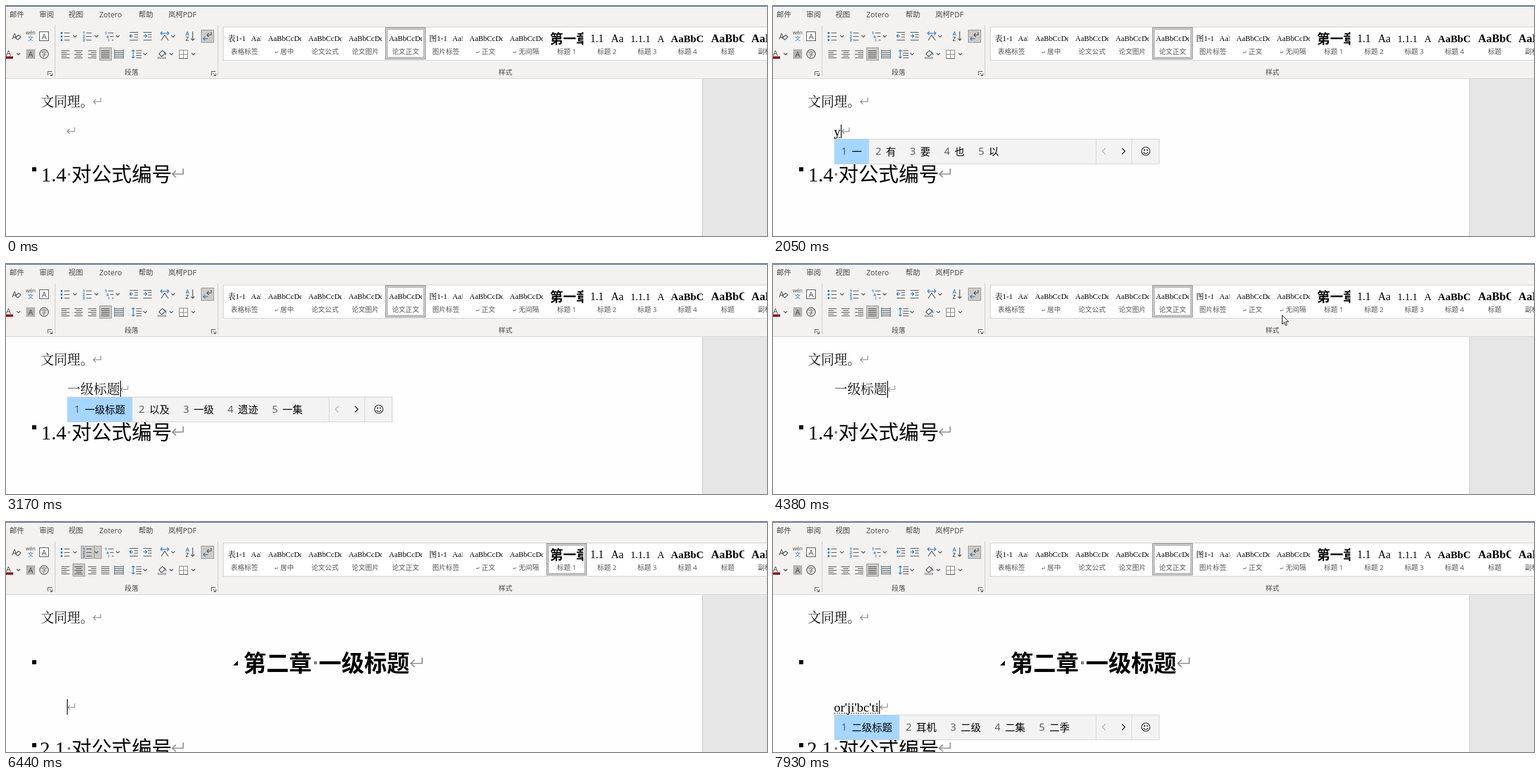
Recreate the animation shown at these times as an HTML page with a canvas. Size 1280x388 px, loop 8000 ms.

```html
<!DOCTYPE html>
<html lang="zh">
<head>
<meta charset="utf-8">
<style>
html, body { margin: 0; overflow: hidden; background: #fefefe; }
canvas { display: block; }
</style>
</head>
<body>
<canvas id="stage" width="1280" height="388"></canvas>
<script>
const g = document.getElementById('stage').getContext('2d');
const LOOP = 8000, TILE = 67.75, GALLERY = 367;
const UI = "'Open Sans','Noto Sans CJK SC','Noto Sans CJK',sans-serif";
const HEI = "'Noto Sans CJK SC','Noto Sans CJK',sans-serif";
const SONG = "'Noto Serif CJK SC','Noto Sans CJK SC','Noto Sans CJK',serif";
const ROMAN = "'Liberation Serif'," + SONG;
const INK = '#444', BLUE = '#2878c0', GRAY = '#808080';

function text(s, x, y, size, family = UI, color = '#000', weight = 400, align = 'left') {
  g.font = `${weight} ${size}px ${family}`;
  g.fillStyle = color;
  g.textAlign = align;
  g.fillText(s, x, y);
}
function rect(x, y, w, h, fill, stroke) {
  if (fill) { g.fillStyle = fill; g.fillRect(x, y, w, h); }
  if (stroke) { g.strokeStyle = stroke; g.lineWidth = 1; g.strokeRect(x + .5, y + .5, w - 1, h - 1); }
}
function line(color, width, ...p) {
  g.beginPath();
  for (let i = 0; i < p.length; i += 2) g.lineTo(p[i], p[i + 1]);
  g.strokeStyle = color;
  g.lineWidth = width;
  g.stroke();
}
function poly(fill, ...p) {
  g.beginPath();
  for (let i = 0; i < p.length; i += 2) g.lineTo(p[i], p[i + 1]);
  g.closePath();
  g.fillStyle = fill;
  g.fill();
}
function circle(x, y, r, color, a = 0, b = 7) {
  g.beginPath();
  g.arc(x, y, r, a, b);
  g.strokeStyle = color;
  g.lineWidth = 1.2;
  g.stroke();
}
const chevron = x => y => line(INK, 1.1, x - 3, y - 1.5, x, y + 1.5, x + 3, y - 1.5);
function returnMark(x, y, s, color = GRAY) {
  const w = Math.max(.8, s / 11), a = s * .32;
  line(color, w, x + s, y - s * .5, x + s, y + .5, x, y + .5);
  line(color, w, x + a, y + .5 - a, x, y + .5, x + a, y + .5 + a);
}
const caret = (x, y, h) => rect(x, y, 1.3, h, '#000');

// ---- ribbon ----
function textLines(x, y, widths, shift = 0, color = INK) {
  widths.forEach((w, i) => rect(x + Math.round((14 - w) * shift), y + i * 3, w, 1, color));
}
const pressed = (x, y, w) => rect(x, y, w, 22, '#cdcbc9', '#979593');

function listIcon(x, kind) {
  for (let i = 0; i < 3; i++) {
    const y = 45 + i * 6, dx = kind === 2 ? i * 3 : 0;
    if (kind) text(kind === 2 ? '1ai'[i] : i + 1, x + dx, y + 3, 6.5, UI, BLUE, 700);
    else rect(x, y - 1, 3, 3, BLUE);
    rect(x + 6 + dx, y, 9 - dx, 1, INK);
  }
}
function indentIcon(x, dir) {
  rect(x, 44, 14, 1, INK);
  rect(x, 57, 14, 1, INK);
  rect(x + 8, 48, 6, 1, INK);
  rect(x + 8, 52, 6, 1, INK);
  line(BLUE, 1.2, x, 50.5, x + 6, 50.5);
  const tip = dir < 0 ? x : x + 6;
  line(BLUE, 1.2, tip - dir * 3, 47.5, tip, 50.5, tip - dir * 3, 53.5);
}
function launcher(x) {
  line(INK, 1, x, 117, x, 110.5, x + 7, 110.5);
  line(INK, 1, x + 2.5, 113, x + 7, 117.5);
  line(INK, 1, x + 7.5, 113.5, x + 7.5, 117.5, x + 3.5, 117.5);
}

function tools(heading) {
  text('A', 10, 56, 14, UI, INK);
  poly('#f3f2f1', 15, 55, 21, 48, 27, 52, 21, 59);
  line(INK, 1.1, 16, 54, 21, 49, 25, 52, 20, 57, 16, 54);
  text('wén', 41.5, 48, 8.5, UI, INK, 400, 'center');
  text('文', 41.5, 58, 9.5, HEI, BLUE, 400, 'center');
  rect(56, 43, 16, 16, '#fff', INK);
  text('A', 64, 56, 13, UI, INK, 400, 'center');

  if (heading) { pressed(126, 40, 35); rect(148, 41, 1, 20, '#979593'); }
  listIcon(92, 0);
  listIcon(129, 1);
  listIcon(166, 2);
  [116, 152, 188, 281].forEach(x => chevron(x)(51));
  indentIcon(208, -1);
  indentIcon(231, 1);
  line(INK, 1.2, 261, 58, 267, 49, 273, 58);
  line(BLUE, 1.2, 260, 46, 274, 46);
  line(BLUE, 1.2, 263, 43, 260, 46, 263, 49);
  line(BLUE, 1.2, 271, 43, 274, 46, 271, 49);
  text('A', 302, 50, 9.5, UI, BLUE, 600);
  text('Z', 302, 59, 9.5, UI, INK, 600);
  line(INK, 1.2, 314, 43, 314, 58);
  line(INK, 1.2, 311, 55, 314, 58, 317, 55);
  pressed(328, 40, 22);
  line(INK, 1.2, 345, 44, 345, 49, 338, 49);
  line(INK, 1.2, 341, 46, 338, 49, 341, 52);
  line(BLUE, 1.2, 332, 55, 340, 55);
  line(BLUE, 1.2, 335, 52, 332, 55, 335, 58);

  text('A', 0, 84, 13, UI, INK);
  rect(0, 85, 12, 4, '#8b0d1c');
  chevron(21)(81);
  rect(34, 73, 15, 16, '#b5b3b1');
  text('A', 41.5, 86, 12.5, UI, INK, 400, 'center');
  circle(64, 81, 7.3, INK);
  text('字', 64, 84.6, 10, HEI, INK, 400, 'center');

  const ragged = [14, 9, 14, 9, 14], full = [14, 14, 14, 14, 14];
  pressed(heading ? 112 : 157, 70, 21);
  textLines(93, 75, ragged);
  textLines(115, 75, ragged, .5);
  textLines(138, 75, ragged, 1);
  textLines(160, 75, full);
  textLines(183, 75, full);
  rect(182, 73, 1, 16, BLUE);
  rect(197, 73, 1, 16, BLUE);
  line(BLUE, 1.2, 214, 74, 214, 88);
  line(BLUE, 1.2, 211.5, 76.5, 214, 74, 216.5, 76.5);
  line(BLUE, 1.2, 211.5, 85.5, 214, 88, 216.5, 85.5);
  [75, 79, 83, 87].forEach(y => rect(219, y, 9, 1, INK));
  line(INK, 1.1, 257, 81, 263, 75, 268, 80, 262, 85, 257, 81);
  line(BLUE, 1.2, 266, 77, 269, 80, 269, 83);
  rect(255, 86, 14, 3, '#fff', GRAY);
  rect(291, 74, 15, 15, '#fff', GRAY);
  line(GRAY, 1, 298.5, 74, 298.5, 89);
  line(GRAY, 1, 291, 81.5, 306, 81.5);
  line(INK, 1, 291, 88.5, 306, 88.5);
  [234, 278, 315].forEach(x => chevron(x)(81));
}

// label, preview, size, weight, family, second preview part and its offset, paragraph mark
const plain = (label, mark) => ({ label, mark, sample: 'AaBbCcDd', size: 12.7 });
const styles = [
  { label: '表格标签', sample: '表1-1', size: 13, tail: 'AaBb', at: 45 },
  plain('居中', true), plain('论文公式'), plain('论文图片'), plain('论文正文'),
  { label: '图片标签', sample: '图1-1', size: 13, tail: 'AaBb', at: 45 },
  plain('正文', true), plain('无间隔', true),
  { label: '标题 1', sample: '第一章', size: 22, weight: 700, family: HEI },
  { label: '标题 2', sample: '1.1', size: 18, tail: 'AaBb'.slice(0, 2), at: 41 },
  { label: '标题 3', sample: '1.1.1', size: 16.7, tail: 'A', at: 51 },
  { label: '标题 4', sample: 'AaBbC', size: 17.5, weight: 700 },
  { label: '标题', sample: 'AaBbCc', size: 19, weight: 700 },
  { label: '副标题', sample: 'AaBbCc', size: 19, weight: 700 }
];

function gallery(selected, hovered) {
  rect(365, 35, 920, 57, '#fff', '#cfcdcb');
  styles.forEach((s, i) => {
    const x = GALLERY + i * TILE, left = Math.round(x), y = s.size > 20 ? 63 : 55 + s.size * .34;
    if (i === selected || i === hovered) {
      rect(left, 36, 68, 54, i === selected ? '#cfcdcb' : '#dddbd9', i === selected ? '#8f8d8b' : '#b8b6b4');
      rect(left + 3, 39, 62, 48, '#fff', i === selected ? '#a9a7a5' : '#cfcdcb');
    }
    g.save();
    g.beginPath();
    g.rect(x + 5, 38, 57, 30);
    g.clip();
    text(s.sample, x + 6, y, s.size, s.family || ROMAN, '#000', s.weight);
    if (s.tail) text(s.tail, x + s.at, y, s.size, ROMAN);
    g.restore();
    const cx = x + 34 + (s.mark ? 4 : 0);
    text(s.label, cx, 81, 11.4, UI, '#555', 400, 'center');
    if (s.mark) returnMark(cx - s.label.length * 5.7 - 9, 78, 4.5, '#666');
  });
}

function ribbon(heading, hovered) {
  rect(0, 0, 1280, 122, '#f3f2f1');
  rect(0, 0, 1280, 1, '#2b579a');
  [['邮件', 6], ['审阅', 56], ['视图', 105], ['Zotero', 157], ['帮助', 223], ['岚柯PDF', 273]]
    .forEach(([s, x]) => text(s, x, 18.5, 12.3, UI, INK));
  rect(82, 33, 1, 85, '#c8c6c4');
  rect(356, 33, 1, 85, '#c8c6c4');
  tools(heading);
  launcher(70.5);
  launcher(345.5);
  text('段落', 211, 116, 11.6, UI, INK, 400, 'center');
  text('样式', 840, 116, 11.6, UI, INK, 400, 'center');
  gallery(heading ? 8 : 4, hovered);
  rect(0, 122, 1280, 1, '#d2d0ce');
}

// ---- input method: [time, typed letters, candidates] ----
const firstTyping = [
  [2050, 'y', '一 有 要 也 以'],
  [2180, 'yi', '一 以 已 亿 意'],
  [2290, "yi'j", '一级 已经 一句 一件 一家'],
  [2385, "yi'ji", '以及 一级 遗迹 一集 一击'],
  [2510, "yi'ji'b", '一级棒 一级 以及 遗迹 一集'],
  [2640, "yi'ji'bc", '一级标 一级表 以及表 一集表 遗迹表'],
  [2770, "yi'ji'bc't", '一级标题 以及 一级 遗迹 一集'],
  [2910, "yi'ji'bc'ti", '一级标题 以及 一级 遗迹 一集']
];
const secondTyping = [
  [7040, 'o', '哦 噢 喔 欧 偶'],
  [7170, 'or', '二 而 儿 尔 耳'],
  [7300, "or'j", '二级 耳机 二季 二集 儿家'],
  [7400, "or'ji", '耳机 二级 二集 二季 二计'],
  [7520, "or'ji'b", '二级 耳机 二集 二季 二计'],
  [7650, "or'ji'bc", '二级标 耳机 二级 二集 二季'],
  [7790, "or'ji'bc't", '二级标题 耳机 二级 二集 二季'],
  [7850, "or'ji'bc'ti", '二级标题 耳机 二级 二集 二季']
];
const latest = (list, t) => list.filter(e => e[0] <= t).pop();

function candidates(words, y) {
  const widths = words.map(w => 41 + 17 * w.length - .4);
  const split = 103 + Math.max(440, widths.reduce((a, b) => a + b));
  const mid = y + 21;
  rect(103, y, split - 103 + 107, 43, '#f3f3f3', '#cfcfcf');
  rect(104, y + 1, widths[0], 41, '#a5d6ff');
  let x = 103;
  words.forEach((w, i) => {
    text(i + 1, x + 12, mid + 6, 17, UI, '#555');
    text(w, x + 29.5, mid + 6.5, 17, HEI);
    x += widths[i];
  });
  rect(split, y + 1, 1, 41, '#d6d6d6');
  rect(split + 60, y + 1, 1, 41, '#d6d6d6');
  line('#aaa', 1.2, split + 16, mid - 5, split + 11, mid, split + 16, mid + 5);
  line('#111', 1.4, split + 44, mid - 5, split + 49, mid, split + 44, mid + 5);
  const cx = split + 84;
  circle(cx, mid, 7, '#111');
  circle(cx, mid, 4, '#111', .4, 2.74);
  rect(cx - 3, mid - 3, 2, 2, '#111');
  rect(cx + 1.5, mid - 3, 2, 2, '#111');
}

function compose(list, t, y) {
  const [, typed, words] = latest(list, t);
  text(typed, 102.5, y + 8, 22, ROMAN);
  const end = 103 + g.measureText(typed).width;
  g.setLineDash([2, 2]);
  line('#000', 1, 103, y + 10.5, end, y + 10.5);
  g.setLineDash([]);
  caret(end, y - 11, 23);
  returnMark(end + 2, y, 12);
  candidates(words.split(' '), y + 13);
}

// ---- document ----
function subheading(number, x, y, bulletY) {
  rect(44, bulletY - 3.5, 7, 7, '#000');
  text(number, x, y + 12.5, 34, ROMAN);
  rect(104, y - 1, 4, 4, GRAY);
  text('对公式编号', 110, y + 13, 33.8, HEI, '#000', 500);
  returnMark(280, y, 18);
}

function page(t) {
  rect(0, 123, 1171, 265, '#fefefe');
  rect(1171, 123, 109, 265, '#e6e6e6');
  rect(1171, 123, 1, 265, '#c6c6c6');
  text('文同理。', 58.5, 169, 22.2, SONG, '#111', 300);
  returnMark(147, 161, 12.5);

  if (t < 4990) {
    subheading('1.4', 59, 283, 275.5);
    if (t < 2050) {
      returnMark(103, 211, 12.5);
      if (t >= 1180) caret(103, 200, 24);
    } else if (t < 3170) {
      compose(firstTyping, t, 211);
    } else {
      text('一级标题', 103, 219, 22.2, SONG, '#111', 300);
      caret(192, 197, 29);
      returnMark(193, 211, 12);
    }
    return;
  }
  const entered = t >= 6380;
  rect(44, 233, 7, 7, '#000');
  text('第二章', 399.5, 251.5, 38.2, HEI, '#000', 700);
  rect(518, 235, 5, 5, GRAY);
  text('一级标题', 526, 251.5, 38.2, HEI, '#000', 700);
  returnMark(681, 238, 19);
  if (t >= 5720) poly('#000', 390, 234, 390, 242, 382, 242);
  if (!entered) caret(678.5, 212, 50);
  subheading('2.1', 57, entered ? 381 : 321.5, entered ? 376.5 : 320.5);
  if (t >= 7040) compose(secondTyping, t, 312);
  else if (entered) {
    caret(102.5, 299, 26);
    returnMark(104, 312, 11.5);
  }
}

// ---- pointer: stepped travel along [time, x, y] keys ----
const trips = [
  { end: 2050, step: 68.2, keys: [[500, 1176, 372], [640, 800, 250], [770, 420, 168], [880, 220, 186], [975, 150, 206], [1250, 164, 208]] },
  { end: 6380, step: 65.8, keys: [[3720, 163, 202], [4050, 560, 150], [4375, 855, 86], [4510, 885, 64], [4570, 912, 61], [4700, 952, 58],
    [5390, 952, 58], [5780, 871, 214]] }
];
function pointerAt(t) {
  const trip = trips.find(p => t >= p.keys[0][0] && t < p.end);
  if (!trip) return null;
  const { keys, step } = trip, start = keys[0][0];
  const now = start + Math.floor((t - start) / step) * step;
  const i = keys.findIndex(k => k[0] > now);
  if (i < 0) return keys[keys.length - 1].slice(1);
  const [t0, x0, y0] = keys[i - 1], [t1, x1, y1] = keys[i], k = (now - t0) / (t1 - t0);
  return [x0 + (x1 - x0) * k, y0 + (y1 - y0) * k];
}
function drawPointer([x, y], beam) {
  g.save();
  g.translate(Math.round(x), Math.round(y));
  if (beam) {
    line('#222', 1, .5, -7, .5, 8);
    line('#222', 1, -3, -6.5, 4, -6.5);
    line('#222', 1, -3, 7.5, 4, 7.5);
  } else {
    const arrow = [.5, .5, .5, 15.5, 4, 12.3, 6.3, 17.8, 8.6, 16.8, 6.3, 11.5, 11, 11.2];
    poly('#fff', ...arrow);
    line('#000', 1, ...arrow, .5, .5);
  }
  g.restore();
}

function draw() {
  const t = performance.now() % LOOP, p = pointerAt(t);
  const overGallery = p && p[1] < 85 && p[1] > 36;
  page(t);
  ribbon(t >= 5120 && t < 6710, overGallery ? Math.floor((p[0] - GALLERY) / TILE) : -1);
  if (t >= 3170 && t < 3240) candidates('一级标题 以及 一级 遗迹 一集'.split(' '), 224);
  if (p) drawPointer(p, t > 1100 && p[1] > 123);
  requestAnimationFrame(draw);
}
draw();
</script>
</body>
</html>
```
